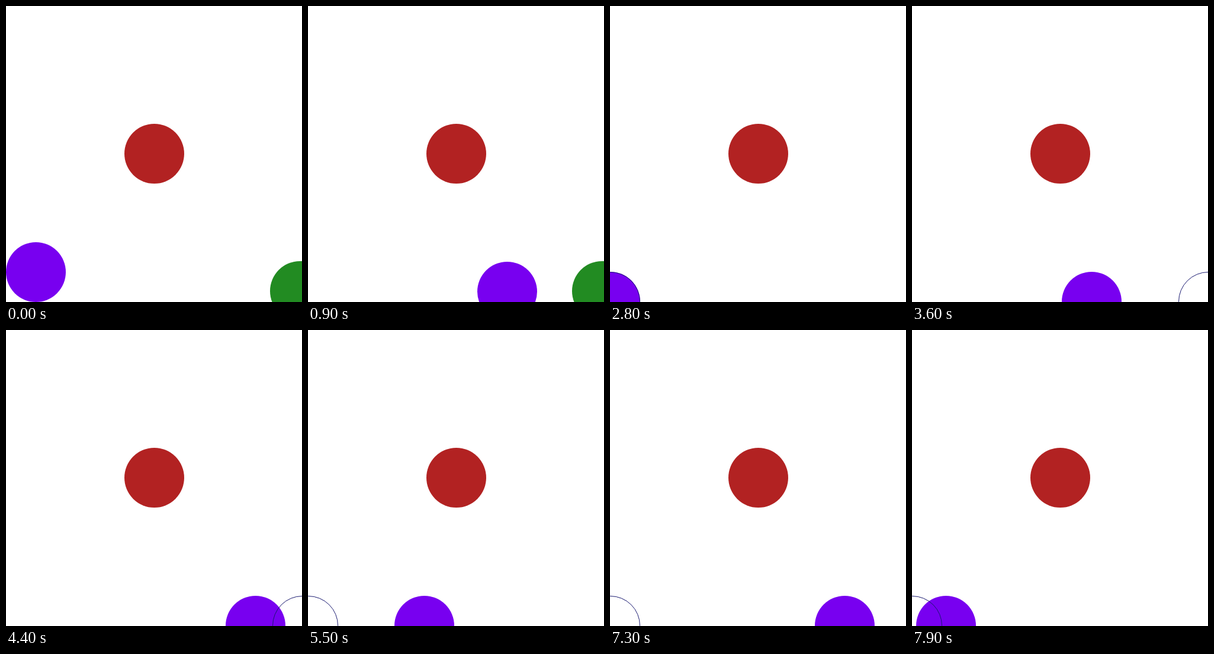
These frames come from a looping animation (500 by 500 pixels, 8000 ms). An HTML page:

```html
<!DOCTYPE html>
<html lang="en">
<head>
<meta charset="utf-8">
<title>Moving ball</title>
<style>
  html, body { margin: 0; width: 100%; height: 100%; overflow: hidden; background: #fff; }
  svg { display: block; width: 100vw; height: 100vh; }
</style>
</head>
<body>
<svg viewBox="0 0 500 500">
  <circle cx="250.5" cy="249.5" r="50.5" fill="#b22222"/>
  <circle id="goal" cx="496.5" cy="481.5" r="50.5" fill="#228b22"/>
  <circle id="ball" r="50.5" fill="#7800f0"/>
  <circle id="marker" cy="499.5" r="50" fill="none" stroke="#191970"/>
</svg>
<script>
  const LOOP = 8000, STEP = 100;
  const [goal, ball, marker] = ['goal', 'ball', 'marker'].map(id => document.getElementById(id));

  // [time, value] pairs, joined by straight motion
  const pathX = [
    [0, 50], [900, 336], [1500, 500], [1690, 500], [2800, 0],
    [3600, 303], [4000, 346], [4400, 421], [4500, 448], [4680, 500],
    [5500, 196], [5930, 0], [6600, 302], [7115, 500], [7900, 57]
  ];
  const pathY = [[0, 450], [900, 483], [1500, 500], [LOOP, 500]];

  // Times at which the marker jumps to the other corner
  const jumps = [1510, 2810, 4690, 5940, 7120];

  function along(path, t) {
    const i = path.findIndex(key => key[0] > t);
    if (i < 0) return path[path.length - 1][1];
    const [t0, a] = path[i - 1], [t1, b] = path[i];
    return a + (b - a) * (t - t0) / (t1 - t0);
  }

  function draw(t) {
    const count = jumps.filter(time => time <= t).length;
    ball.setAttribute('cx', Math.round(along(pathX, t)) + 0.5);
    ball.setAttribute('cy', Math.round(along(pathY, t)) - 0.5);
    goal.style.display = count ? 'none' : '';
    marker.style.display = count ? '' : 'none';
    marker.setAttribute('cx', count % 2 ? 0.5 : 500.5);
  }

  const start = performance.now();
  function tick() {
    const t = (performance.now() - start) % LOOP;
    draw(Math.floor(t / STEP) * STEP);
    requestAnimationFrame(tick);
  }
  tick();
</script>
</body>
</html>
```
